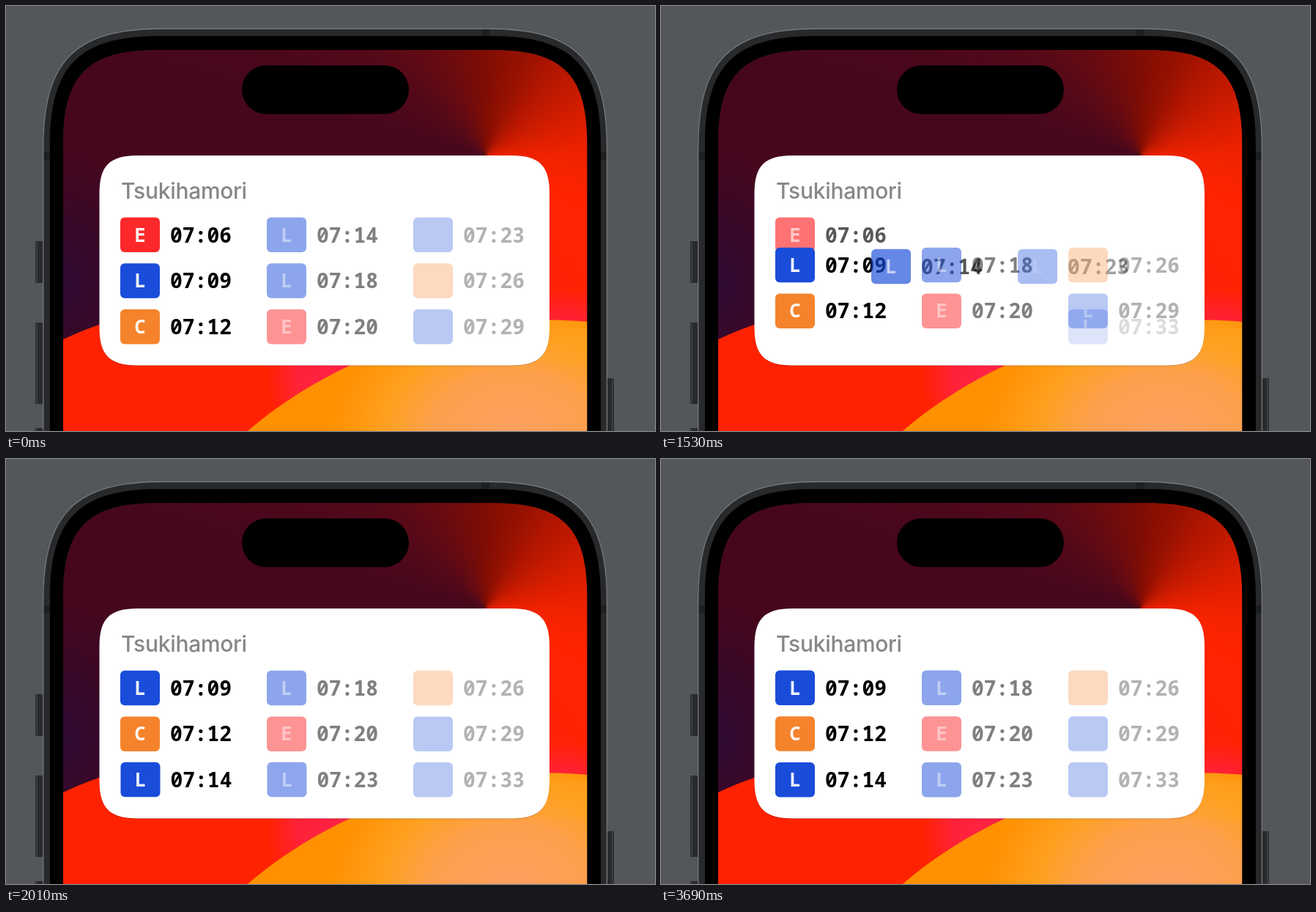
Recreate the animation shown at these times as an HTML page. Size 886 px wide and 580 px high, loop 3.72 s.

```html
<!DOCTYPE html>
<html lang="en">
<head>
<meta charset="utf-8">
<title>Departures widget</title>
<style>
html, body { margin: 0; width: 100%; height: 100%; overflow: hidden; background: #53565b; }
#stage { position: absolute; left: 0; top: 0; width: 886px; height: 580px; overflow: hidden; }
#wall {
  position: absolute; left: 70px; top: 50px; width: 732px; height: 530px; border-radius: 100px 100px 0 0;
  background:
    radial-gradient(ellipse 120px 190px at 10px 330px, rgba(38, 10, 56, .75), rgba(38, 10, 56, 0)),
    radial-gradient(ellipse 110px 45px at 690px 382px, rgba(255, 32, 64, .9), rgba(255, 32, 64, 0)),
    conic-gradient(from 0deg at 585px 155px, #800d03 0deg, #961102 20deg, #b21600 38deg, #c41a00 52deg,
      #da1e00 70deg, #f02200 90deg, #ff2400 115deg, #ff2208 165deg, #46071d 200deg,
      #46071d 285deg, #540918 312deg, #680b11 336deg, #800d03 360deg);
}
svg { position: absolute; left: 0; top: 0; display: block; }
.title { font: 500 30px Inter, "Open Sans", sans-serif; letter-spacing: -.3px; fill: #87878a; }
.time { font: 600 28px "Noto Sans Mono", monospace; }
.code { font: 600 26px "Noto Sans Mono", monospace; fill: #fff; text-anchor: middle; }
</style>
</head>
<body>
<div id="stage">
<div id="wall"></div>
<svg id="art" width="886" height="580" viewBox="0 0 886 580">
  <defs>
    <radialGradient id="red" gradientUnits="userSpaceOnUse" cx="465" cy="508" r="110">
      <stop offset="0" stop-color="#ff2248"/>
      <stop offset=".6" stop-color="#ff2238"/>
      <stop offset="1" stop-color="#ff2200"/>
    </radialGradient>
    <radialGradient id="glow" gradientUnits="userSpaceOnUse" cx="690" cy="590" r="250"
      gradientTransform="translate(0 118) scale(1 .8)">
      <stop offset="0" stop-color="#fda062"/>
      <stop offset=".45" stop-color="#fea04c"/>
      <stop offset=".7" stop-color="#ffa020"/>
      <stop offset="1" stop-color="#ff9000"/>
    </radialGradient>
    <linearGradient id="amber" x1="0" x2="1">
      <stop offset="0" stop-color="#ffa424" stop-opacity="0"/>
      <stop offset="1" stop-color="#ffa424"/>
    </linearGradient>
    <clipPath id="lap"><rect id="lapBox" x="556" y="414" width="54" height="0" rx="6"/></clipPath>
  </defs>
  <path d="M78 455Q103 443 130 434H500V580H78z" fill="url(#red)"/>
  <path d="M330 580C400 519 570 411 796 431V580z" fill="url(#glow)"/>
  <rect x="690" y="440" width="104" height="50" fill="url(#amber)" opacity=".5"/>
  <g id="phone"></g>
  <g id="card"></g>
  <text class="title" x="157" y="263">Tsukihamori</text>
  <g id="list"></g>
  <g id="cross" clip-path="url(#lap)">
    <rect x="556" y="414" width="54" height="48" fill="#1a4cda" fill-opacity=".12"/>
    <text class="code" id="crossA" x="583" fill-opacity=".35">L</text>
    <text class="code" x="583" y="447" fill-opacity=".35">L</text>
  </g>
</svg>
</div>
<script>
const LOOP = 3720, STEP = 30, START = 1447, RATE = 0.0147;
const KIND = { E: '#fd282a', L: '#1a4cda', C: '#f5832c' };
const FADE = [1, 0.5, 0.3];
const MARK = [0.93, 0.45, 0];
const TRAINS = 'E06 L09 C12 L14 L18 E20 L23 C26 L29 L33'.split(' ');
const $ = id => document.getElementById(id);

function add(parent, tag, attrs, text) {
  const el = document.createElementNS('http://www.w3.org/2000/svg', tag);
  set(el, attrs);
  if (text) el.textContent = text;
  parent.appendChild(el);
  return el;
}

function set(el, attrs) {
  for (const k in attrs) el.setAttribute(k, attrs[k]);
}

// Rounded box with continuous corners
function smooth(x, y, w, h, r) {
  const e = 1.3 * r, c = 0.348 * r, X = x + w, Y = y + h;
  return `M${x} ${y + e}C${x} ${y + c} ${x + c} ${y} ${x + e} ${y}` +
    `H${X - e}C${X - c} ${y} ${X} ${y + c} ${X} ${y + e}` +
    `V${Y - e}C${X} ${Y - c} ${X - c} ${Y} ${X - e} ${Y}` +
    `H${x + e}C${x + c} ${Y} ${x} ${Y - c} ${x} ${Y - e}z`;
}

function buildPhone() {
  const g = $('phone');
  const box = (x, y, width, height, fill, rx = 0) => add(g, 'rect', { x, y, width, height, fill, rx });
  for (const [y, h] of [[321, 57], [432, 111], [576, 20]]) {
    box(40, y, 11, h, '#292a2c', 1);
    box(41, y + 1, 2, h - 2, '#3b3c3f');
  }
  box(820, 508, 10, 90, '#292a2c', 1);
  box(827, 509, 2, 90, '#3b3c3f');

  const hole = smooth(78, 60, 715.5, 900, 98);
  add(g, 'path', { d: smooth(50.5, 31, 770, 960, 125) + hole, fill: '#28292a', 'fill-rule': 'evenodd' });
  for (const x of [51, 812]) box(x, 200, 9, 10, '#1d1e1f');
  box(649, 32, 11, 9, '#1d1e1f');
  add(g, 'path', { d: smooth(60, 41, 752, 940, 115) + hole, fill: '#000', 'fill-rule': 'evenodd' });
  add(g, 'path', { d: smooth(50.8, 31, 769.6, 960, 125), fill: 'none', stroke: '#77797c', 'stroke-width': 1.3 });
  box(322, 81, 228, 66.5, '#000', 33.2);

  const card = smooth(127.5, 204, 614.5, 286.5, 40);
  add($('card'), 'path', { d: card, transform: 'translate(0 1)', fill: '#000', opacity: 0.18 });
  add($('card'), 'path', { d: card, fill: '#fff' });
}

function buildRow(train) {
  const g = add($('list'), 'g', {});
  const kind = train[0];
  return {
    g,
    chip: add(g, 'rect', { x: 0, y: 0, width: 54, height: 47.5, rx: 6, fill: KIND[kind] }),
    code: add(g, 'text', { class: 'code', x: 27, y: 33 }, kind),
    time: add(g, 'text', { class: 'time', x: 68, y: 34 }, '07:' + train.slice(1))
  };
}

// Slots fill column by column, three rows each
const slot = i => ({ col: Math.floor(i / 3), row: i % 3 });
const mix = (a, b, p) => a + (b - a) * p;

function place(row, i, p) {
  const from = slot(Math.min(i, 8)), to = slot(Math.max(i - 1, 0));
  const x = 156 + 200 * mix(from.col, to.col, p);
  const y = 288.5 + 62.8 * mix(from.row, to.row, p);
  const ink = mix(FADE[from.col], FADE[to.col], p);
  const show = i === 0 ? 1 - p : i === 9 ? Math.min(1, p * 1.35) : 1;
  set(row.g, { transform: `translate(${x} ${y})`, display: show > 0 ? 'inline' : 'none' });
  set(row.chip, { 'fill-opacity': ink * show });
  set(row.code, { 'fill-opacity': mix(MARK[from.col], MARK[to.col], p) * show });
  set(row.time, { 'fill-opacity': ink * show });
}

buildPhone();
const rows = TRAINS.map(buildRow);

function draw(ms) {
  const t = Math.floor((ms % LOOP) / STEP) * STEP;
  const s = Math.max(0, t - START) * RATE;
  const p = s > 14 ? 1 : 1 - (1 + s) * Math.exp(-s);
  rows.forEach((row, i) => place(row, i, p));
  set($('lapBox'), { height: Math.max(0, 47.5 - 62.8 * p) });
  set($('crossA'), { y: 447 - 62.8 * p });
  set($('cross'), { opacity: Math.min(1, p * 3), display: p > 0 && p < 0.75 ? 'inline' : 'none' });
}

const begin = performance.now();
function tick(now) {
  draw(Math.max(0, now - begin));
  requestAnimationFrame(tick);
}
draw(0);
requestAnimationFrame(tick);
</script>
</body>
</html>
```
